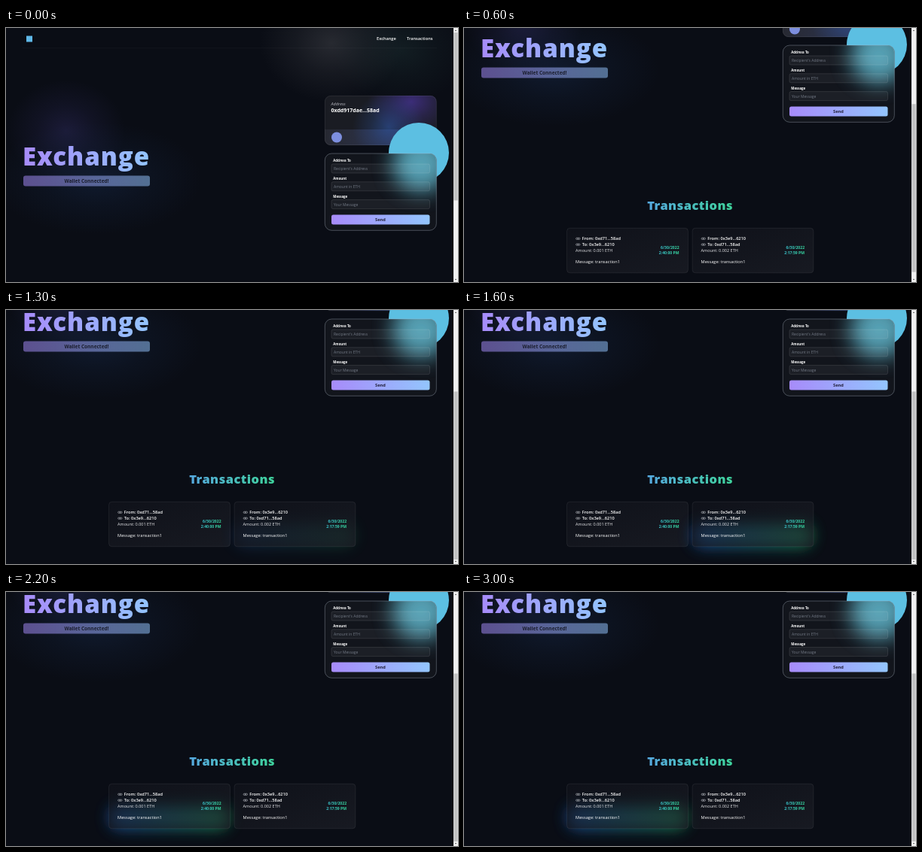
An HTML page for the animation above (3100 ms loop, 600 by 338 pixels).

```html
<!DOCTYPE html>
<html lang="en">
<head>
<meta charset="utf-8">
<title>Exchange</title>
<style>
  html, body { margin: 0; height: 100%; overflow: hidden; background: #0a0d15; }
  svg { display: block; width: 100vw; height: 100vh; }
  text { font-family: "Open Sans", sans-serif; white-space: pre; }
</style>
</head>
<body>
<svg id="stage" viewBox="0 0 600 338" xmlns="http://www.w3.org/2000/svg"></svg>
<script>
const LOOP = 3100, STEP = 100, PAGE = 493, VIEW = 338;
// Scroll offset at each step; the last value holds.
const SCROLL = [0, 0, 0, 0, 8, 76, 144, 155];

const linear = (id, from, to) =>
  `<linearGradient id="${id}"><stop stop-color="${from}"/><stop offset="1" stop-color="${to}"/></linearGradient>`;

const radial = (id, color, alpha) =>
  `<radialGradient id="${id}"><stop stop-color="${color}" stop-opacity="${alpha}"/>
   <stop offset=".5" stop-color="${color}" stop-opacity="${alpha * .42}"/>
   <stop offset="1" stop-color="${color}" stop-opacity="0"/></radialGradient>`;

const blur = (id, amount) =>
  `<filter id="${id}" x="-60%" y="-150%" width="220%" height="400%"><feGaussianBlur stdDeviation="${amount}"/></filter>`;

const rect = (x, y, w, h, r, fill, extra = '') =>
  `<rect x="${x}" y="${y}" width="${w}" height="${h}" rx="${r}" fill="${fill}" ${extra}/>`;

const glow = (x, y, rx, ry, id) =>
  `<ellipse cx="${x}" cy="${y}" rx="${rx}" ry="${ry}" fill="url(#${id})"/>`;

// y is the middle of the capital letters
const text = (x, y, size, weight, fill, str, extra = '') =>
  `<text x="${x}" y="${y + size * .36}" font-size="${size}" font-weight="${weight}" fill="${fill}" ${extra}>${str}</text>`;

const MIDDLE = 'text-anchor="middle"', END = 'text-anchor="end"';

const defs = `<defs>
  ${linear('violet', '#a78bfa', '#93c5fd')}
  ${linear('mint', '#56a9e0', '#3ed39c')}
  ${linear('date', '#38bdc8', '#34d399')}
  ${linear('hover', '#1a5cb4', '#1f9a5c')}
  ${linear('strip', '#282a33', '#34406c')}
  <linearGradient id="panel" x2="1" y2="1"><stop stop-color="#12141c"/><stop offset="1" stop-color="#20222a"/></linearGradient>
  ${radial('gray', '#42444a', .52)}
  ${radial('green', '#24403f', .32)}
  ${radial('purple', '#35306c', .4)}
  ${radial('navy', '#1c3560', .34)}
  ${radial('indigo', '#4a349c', .7)}
  ${radial('azure', '#2f56a4', .6)}
  ${blur('soft', 10)}
  ${blur('wide', 14)}
  <clipPath id="cardClip">${rect(423, 90, 148.5, 66, 8, '#000')}</clipPath>
  <clipPath id="formClip">${rect(423, 167, 148.5, 102.5, 9, '#000')}</clipPath>
</defs>`;

const backdrop =
  glow(432, 20, 95, 78, 'gray') + glow(525, 30, 90, 70, 'green') +
  glow(80, 137, 78, 68, 'purple') + glow(120, 200, 140, 75, 'navy');

const header =
  rect(27, 10.5, 8, 8, 0, '#5fb8e8') +
  text(492, 14, 5.65, 600, '#fff', 'Exchange') +
  text(532, 14, 5.65, 600, '#fff', 'Transactions') +
  rect(22, 26.5, 550, .6, 0, '#fff', 'opacity=".05"');

const hero =
  text(22, 171.5, 33, 800, 'url(#violet)', 'Exchange', 'letter-spacing="1"') +
  rect(23, 196.5, 168, 14, 3, 'url(#violet)', 'opacity=".52"') +
  text(107, 203.8, 6.5, 700, '#1b1e2e', 'Wallet Connected!', MIDDLE);

const wallet = `<g clip-path="url(#cardClip)">
  ${rect(423, 90, 149, 66, 0, '#1a1c23')}
  ${rect(423, 135, 149, 21, 0, 'url(#strip)', 'opacity=".9"')}
  ${glow(538, 98, 58, 44, 'indigo')}
  ${glow(508, 132, 48, 46, 'azure')}
  </g>
  ${rect(423.3, 90.3, 148, 65.4, 8, 'none', 'stroke="#fff" stroke-opacity=".12" stroke-width=".6"')}
  ${text(431.5, 101, 5.6, 400, '#b5b6be', 'Address', 'font-style="italic"')}
  ${text(431.5, 109.3, 7, 700, '#fff', '0xdd917dae...58ad')}
  <circle cx="439" cy="145.5" r="7" fill="#7d8fdf"/>
  <circle cx="548" cy="166" r="40" fill="#5cbfe2"/>`;

const field = (y, label, hint) =>
  text(434.3, y - 4.2, 4.4, 700, '#fff', label) +
  rect(432, y, 130.5, 12, 2, '#fff', 'fill-opacity=".045" stroke="#fff" stroke-opacity=".15" stroke-width=".7"') +
  text(435, y + 6.2, 5, 400, '#737a86', hint);

const form = `<g clip-path="url(#formClip)">
  ${rect(423, 167, 149, 103, 0, '#12151c')}
  <ellipse cx="551" cy="181" rx="38" ry="37" fill="#68c4da" opacity=".8" filter="url(#wide)"/>
  </g>
  ${rect(423.3, 167, 148, 102.3, 9, 'none', 'stroke="#a9b4c0" stroke-opacity=".58" stroke-width=".65"')}
  ${field(181, 'Address To', "Recipient's Address")}
  ${field(204.8, 'Amount', 'Amount in ETH')}
  ${field(228.6, 'Message', 'Your Message')}
  ${rect(432, 248.5, 130.5, 13, 2.5, 'url(#violet)')}
  ${text(497, 255, 5.7, 700, '#211f38', 'Send', MIDDLE)}`;

const link = (x, y) => [0, 2.3].map(dx =>
  rect(x + dx, y - 1.1, 3.1, 2.2, 1.1, 'none', 'stroke="#b4b6bd" stroke-width=".65"')).join('');

const transaction = (id, x, from, to, amount, time) => `
  ${rect(x + 1, 440, 158, 30, 14, 'url(#hover)', `id="${id}" filter="url(#soft)"`)}
  ${rect(x, 410.3, 160.8, 59.5, 4, 'url(#panel)', 'fill-opacity=".6" stroke="#fff" stroke-opacity=".1" stroke-width=".7"')}
  ${link(x + 12, 424.3)}${link(x + 12, 432.2)}
  ${text(x + 20.2, 424.2, 5.65, 600, '#fff', 'From: ' + from)}
  ${text(x + 20.2, 432.2, 5.65, 600, '#fff', 'To: ' + to)}
  ${text(x + 11.5, 440, 5.5, 400, '#e8e9ec', `Amount: ${amount} ETH`)}
  ${text(x + 11.5, 455, 5.65, 500, '#fff', 'Message: transaction1')}
  ${text(x + 149, 436.6, 5.1, 700, 'url(#date)', '6/30/2022', END)}
  ${text(x + 149, 443.2, 5.1, 700, 'url(#date)', time, END)}`;

const ann = '0xd71...58ad', bob = '0x3e9...6210';
const history =
  text(300.2, 380.3, 16.5, 800, 'url(#mint)', 'Transactions', MIDDLE + ' letter-spacing=".4"') +
  transaction('first', 136.6, ann, bob, '0.001', '2:40:00 PM') +
  transaction('second', 303.1, bob, ann, '0.002', '2:17:59 PM');

const scrollbar =
  rect(594, 0, 6, VIEW, 0, '#f1f1f1') +
  rect(594.5, 6, 5, 223.5, 0, '#c1c1c1', 'id="thumb"') +
  '<path d="M595.7 4l1.3-1.6 1.3 1.6zM595.7 334l1.3 1.6 1.3-1.6z" fill="#555"/>';

const stage = document.getElementById('stage');
stage.innerHTML = defs + rect(0, 0, 600, VIEW, 0, '#0a0d15') +
  `<g id="page">${backdrop}${header}${hero}${wallet}${form}${history}</g>` + scrollbar;

const [page, thumb, first, second] =
  ['page', 'thumb', 'first', 'second'].map(id => document.getElementById(id));

const ramp = (t, from, to) => Math.min(1, Math.max(0, (t - from) / (to - from)));

function draw(now) {
  const step = Math.floor(now % LOOP / STEP), t = step * STEP;
  const top = SCROLL[Math.min(step, SCROLL.length - 1)];
  page.setAttribute('transform', `translate(0 ${-top})`);
  thumb.setAttribute('y', 6 + top * (VIEW - 12) / PAGE);
  first.setAttribute('opacity', .8 * ramp(t, 1800, 2100));
  second.setAttribute('opacity', .8 * (ramp(t, 1200, 1500) - ramp(t, 1800, 2100)));
  requestAnimationFrame(draw);
}
requestAnimationFrame(draw);
</script>
</body>
</html>
```
